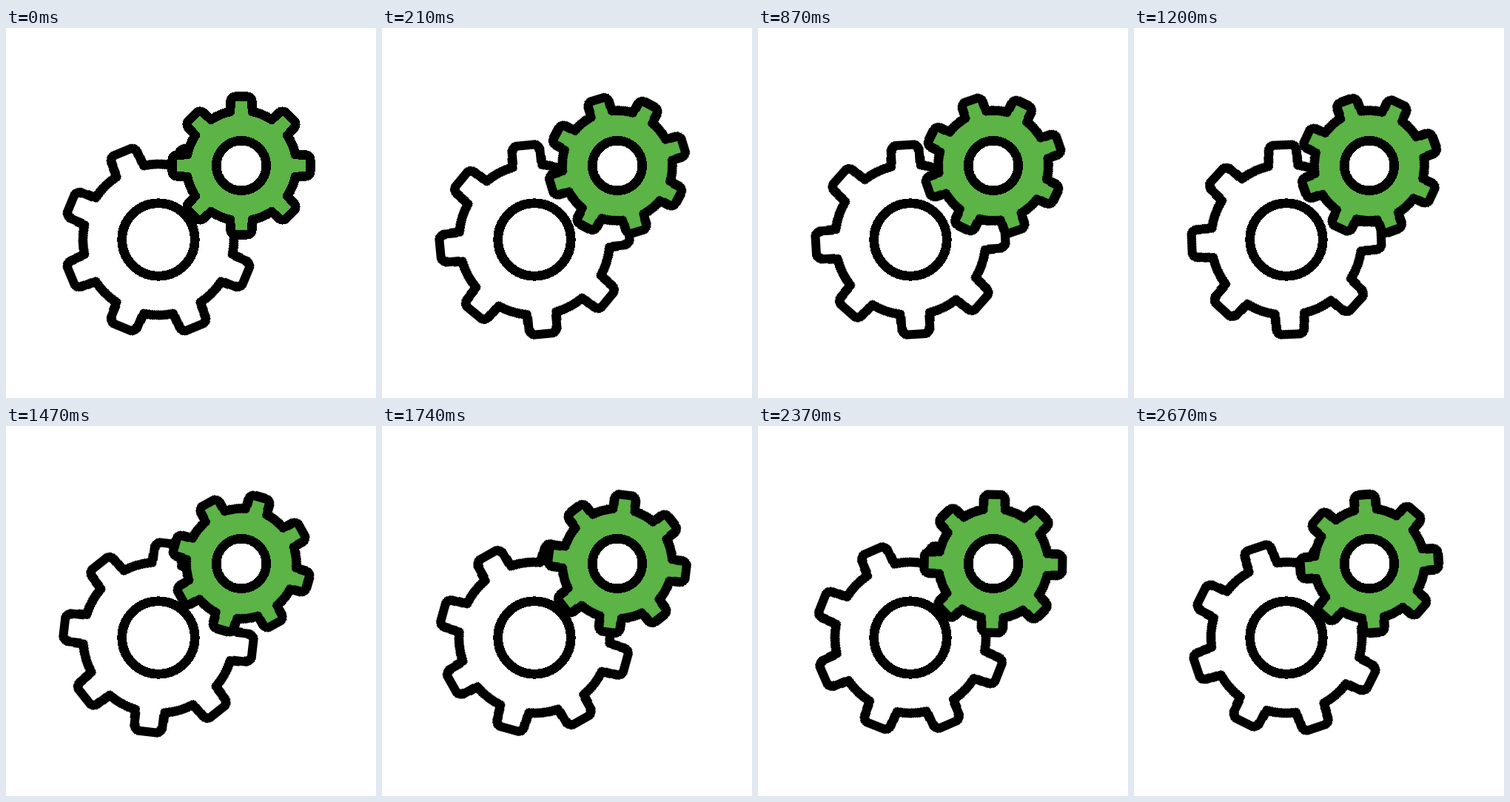
An HTML page for the animation above (2700 ms loop, 500 by 500 pixels).

```html
<!DOCTYPE html>
<html lang="en">
<head>
<meta charset="utf-8">
<title>Gears</title>
<style>
  html, body { margin: 0; width: 100%; height: 100%; overflow: hidden; background: #fff; }
  svg { display: block; width: 100%; height: 100%; }
  .gear { stroke: #000; stroke-width: 12.6; stroke-linejoin: round; shape-rendering: crispEdges; }
</style>
</head>
<body>
<svg viewBox="0 0 500 500"></svg>
<script>
const TEETH = 8, LOOP = 2700, STEPS = 90;
const svg = document.querySelector('svg');

const gears = [
  { x: 206, y: 286, body: 102, tip: 128, base: 20, top: 18.7, round: 8, hole: 49.3,
    fill: '#fff', start: 22.5, turn: -360 },
  { x: 318, y: 186, body: 74.5, tip: 93.3, base: 15, top: 14.4, round: 7, hole: 33.8,
    fill: '#5cb346', start: 0, turn: 360 }
];

function add(parent, tag, attrs) {
  const el = document.createElementNS('http://www.w3.org/2000/svg', tag);
  for (const name in attrs) el.setAttribute(name, attrs[name]);
  return parent.appendChild(el);
}

function outline({ body, tip, base, top, round }) {
  const foot = Math.sqrt(body * body - base * base);
  const arc = r => `A${r} ${r} 0 0 1 `;
  let d = '';
  for (let i = 0; i < TEETH; i++) {
    const a = i * 2 * Math.PI / TEETH, c = Math.cos(a), s = Math.sin(a);
    // u runs across the tooth, v outwards from the hub
    const p = (u, v) => `${(u * c + v * s).toFixed(2)} ${(u * s - v * c).toFixed(2)} `;
    d += (i ? arc(body) : 'M') + p(-base, foot)
      + 'L' + p(-top, tip - round)
      + arc(round) + p(round - top, tip)
      + 'L' + p(top - round, tip)
      + arc(round) + p(top, tip - round)
      + 'L' + p(base, foot);
  }
  return d + arc(body) + `${-base} ${-foot}Z`;
}

for (const g of gears) {
  const hub = add(svg, 'g', { class: 'gear', transform: `translate(${g.x} ${g.y})` });
  const wheel = add(hub, 'path', { d: outline(g), fill: g.fill });
  add(hub, 'circle', { r: g.hole, fill: '#fff' });
  wheel.animate(
    [g.start, g.start + g.turn].map(a => ({ transform: `rotate(${a}deg)` })),
    { duration: LOOP, iterations: Infinity, easing: `steps(${STEPS}, end)` }
  );
}
</script>
</body>
</html>
```
